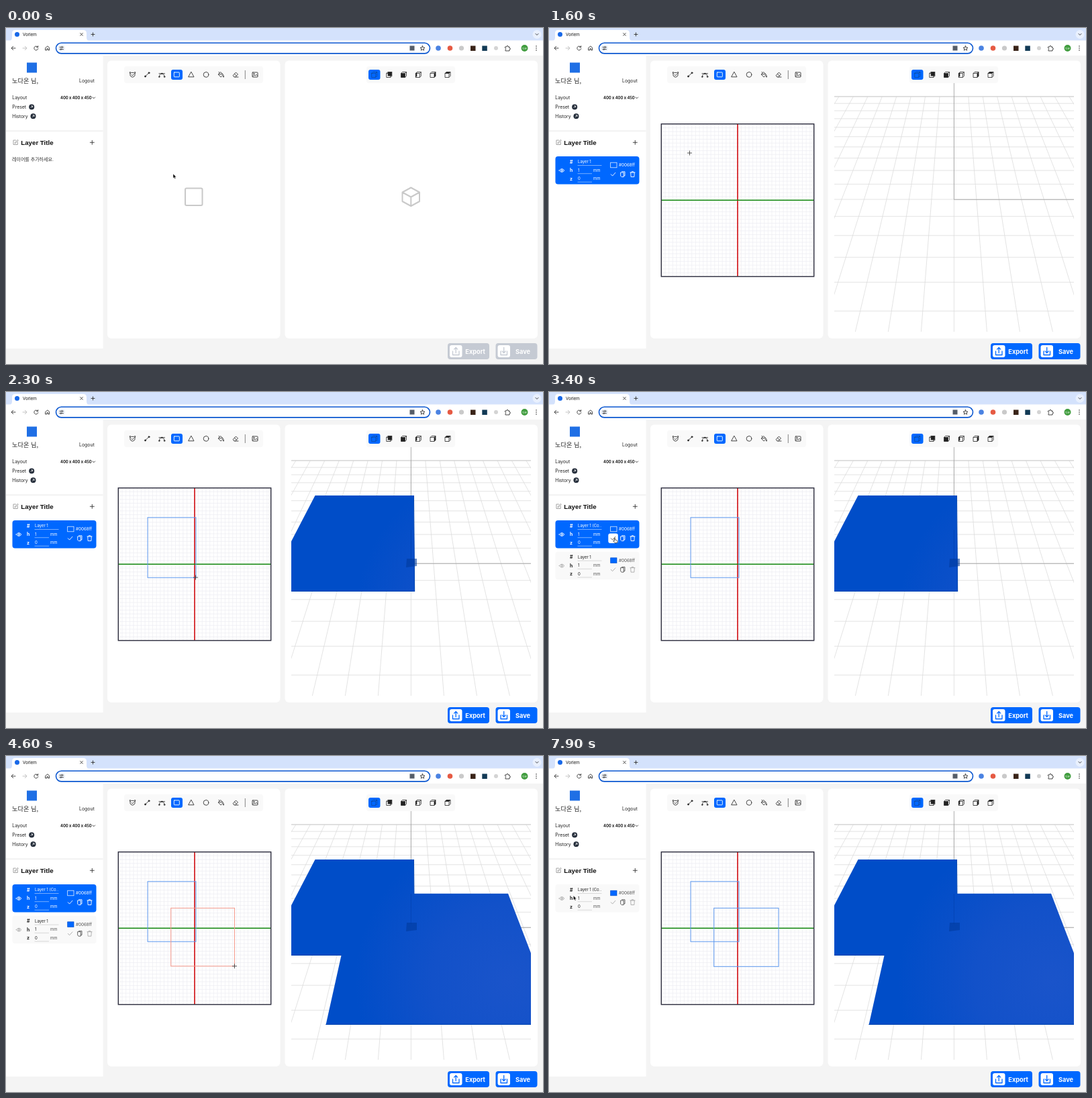
Animation, 800 px wide and 500 px high, one loop 8000 ms. Source, as an HTML page:

```html
<!DOCTYPE html>
<html lang="ko">
<head>
<meta charset="utf-8">
<title>Studio</title>
<style>
html, body { margin: 0; width: 100%; height: 100%; overflow: hidden; background: #f4f4f4; }
svg { display: block; width: 800px; height: 500px; font-family: Inter, sans-serif; }
.ui { font-family: Roboto, sans-serif; fill: #1f1f1f; }
.ko { font-family: "Noto Sans CJK KR", "Noto Sans CJK", sans-serif; }
.i { fill: none; stroke: #333; stroke-width: .9; stroke-linecap: round; stroke-linejoin: round; }
.i .f { fill: #222; }
.b { font-weight: 700; }
.btn { fill: #c5cad3; }
.on .btn { fill: #0068ff; }
.btn + rect { fill: #fff; }
.card { --bg: #f9f9f9; --ink: #222; --soft: #555; --icon: #aaa; --line: #ccc; --edge: #0050cc; --hover: #dcdcdc; font-size: 6px; }
.card.active { --bg: #0068ff; --ink: #fff; --soft: #fff; --icon: #fff; --line: #a9ccff; --edge: #fff; --hover: #fff; }
.card text { fill: var(--ink); }
.card .soft { fill: var(--soft); }
.card .i { stroke: var(--icon); }
.card .i.copy { stroke: var(--soft); }
.card .under { stroke: var(--line); stroke-width: .7; }
.card .hover { fill: var(--hover); }
.card.active .hot { stroke: #555; }
</style>
</head>
<body>
<svg id="stage" viewBox="0 0 800 500">
<defs>
  <clipPath id="view"><rect x="425" y="82" width="357" height="370"/></clipPath>
  <radialGradient id="blue" gradientUnits="userSpaceOnUse" cx="750" cy="335" r="230">
    <stop offset="0" stop-color="#1a54ca"/><stop offset=".5" stop-color="#1251c9"/><stop offset="1" stop-color="#004dc8"/>
  </radialGradient>
  <g id="box">
    <path d="M-4-2H2V4H-4ZM-4-2L-2-4H4L2-2M4-4V2L2 4" fill="none" stroke="#222" stroke-width=".8" stroke-linejoin="round"/>
  </g>
  <g id="go"><circle r="4" fill="#222b38"/><path d="M-1.5 1.5 1.5-1.5M-.9-1.5H1.5V.9" fill="none" stroke="#fff" stroke-width=".8"/></g>
</defs>

<!-- browser -->
<rect width="800" height="24" fill="#d4e2fc"/>
<path d="M5 19Q9 19 9 14V8Q9 3 14 3H115Q120 3 120 8V14Q120 19 124 19Z" fill="#fff"/>
<rect y="18.500" width="800" height="22.500" fill="#fff"/>
<circle cx="16.500" cy="9.500" r="3.500" fill="#1868e8"/>
<g class="ui">
  <text x="25" y="11.800" font-size="6.500">Vorlem</text>
  <text x="92" y="32.400" font-size="6.850">vorlem.site.example/studio</text>
</g>
<circle cx="791" cy="9.500" r="6.500" fill="#e9f0fe"/>
<g class="i">
  <path d="M110.700 7.700l3.600 3.600m0-3.600-3.600 3.600M127 9.500h5M129.500 7v5M789 8.500l2 2 2-2"/>
  <path d="M14 30H8.200m2.500-2.700L8 30l2.700 2.700"/>
  <path d="M25 30h5.800m-2.500-2.700L31 30l-2.700 2.700" stroke="#bbb"/>
  <path d="M47.300 28.300a3 3 0 1 0 .5 2.400M47.700 26.700v2h-2"/>
  <path d="M59 29.300l2.800-2.300 2.800 2.300v3.700h-1.900v-2.200h-1.800V33H59z"/>
</g>
<rect x="74.500" y="22.300" width="557" height="15.600" rx="7.800" fill="#fff" stroke="#0b57d0" stroke-width="1.600"/>
<circle cx="82.500" cy="30" r="5.600" fill="#eef2fa"/>
<g class="i" stroke-width=".8">
  <path d="M80 28.500h2.200M84.500 28.500h.8M80 31.600h.8M83.200 31.600h2.200"/>
  <circle cx="83.500" cy="28.500" r=".9"/><circle cx="81.800" cy="31.600" r=".9"/>
  <path d="M620.500 26.700l1 2.300 2.500.2-1.900 1.600.6 2.400-2.200-1.300-2.200 1.300.6-2.400-1.900-1.600 2.500-.2z"/>
  <path d="M744 28h2v-.6a1 1 0 0 1 2 0v.6h2v2h.4a1 1 0 0 1 0 2H750v2h-6v-1.800a1.200 1.200 0 0 0 0-2.200z"/>
</g>
<rect x="601.500" y="26.500" width="7" height="7" fill="#555d68"/>
<circle cx="644" cy="30" r="3.800" fill="#4a82e2"/>
<circle cx="661.500" cy="30" r="3.800" fill="#e65a43"/>
<circle cx="678.500" cy="30" r="3.600" fill="#c9c9c9"/>
<rect x="692" y="26.500" width="7.500" height="7.500" fill="#3a2418"/>
<rect x="709.300" y="26.500" width="7.500" height="7.500" fill="#123a55"/>
<circle cx="730" cy="30" r="3" fill="#d4d4d4"/>
<circle cx="772.500" cy="30" r="5" fill="#419d3f"/>
<text class="ko" x="772.500" y="31.500" font-size="3.800" text-anchor="middle" fill="#fff">다온</text>
<g fill="#333"><circle cx="790" cy="27" r=".8"/><circle cx="790" cy="30" r=".8"/><circle cx="790" cy="33" r=".8"/></g>

<!-- sidebar -->
<path d="M0 41H144.500V477H0Z" fill="#fff"/>
<rect y="152" width="144.500" height="2.500" fill="#f4f4f4"/>
<rect x="31" y="51.500" width="15" height="15" fill="#1f6fe5"/>
<text class="ko" x="9" y="81.800" font-size="9.200" font-weight="500" fill="#222">노다온 님,</text>
<g font-size="6.900" fill="#222">
  <text x="109" y="81.300">Logout</text>
  <text x="9.300" y="106.300">Layout</text>
  <text x="9.300" y="120.200">Preset</text>
  <text x="9.300" y="134">History</text>
  <text class="b" x="81" y="105.800" font-size="5.750">400 x 400 x 450</text>
</g>
<use href="#go" x="38.200" y="117.500"/><use href="#go" x="40.500" y="131.300"/>
<path class="i" d="M129 103l1.800 1.800 1.800-1.800" stroke-width=".7"/>
<path class="i" d="M14.500 167H11v6.500h6.300V170M13.200 171.500l.4-1.500 3.800-3.600 1 1-3.800 3.600z" style="stroke:#999" stroke-width=".7"/>
<text class="b" x="22.300" y="174" font-size="9.700" font-family="Liberation Sans, Arial, sans-serif" fill="#111">Layer Title</text>
<path class="i" d="M125.300 170.300h6M128.300 167.300v6"/>
<text id="hint" class="ko" x="9" y="197.500" font-size="7" fill="#333">레이어를 추가하세요.</text>
<g id="cards"></g>

<!-- panels -->
<rect x="151" y="48.500" width="257.500" height="413.500" rx="6" fill="#fff"/>
<rect x="415.500" y="48.500" width="376.500" height="413.500" rx="6" fill="#fff"/>
<rect x="176" y="57" width="207" height="25" rx="4" fill="#f9f9f9"/>
<rect x="537" y="57" width="132" height="25" rx="4" fill="#f9f9f9"/>
<rect x="246" y="62" width="17" height="15" rx="3" fill="#0068ff"/>
<rect x="540" y="62" width="17.500" height="15" rx="3" fill="#0068ff"/>
<g class="i">
  <path d="M185.300 67.500a3.700 3.700 0 1 0 6.400 0M184.500 67.500v-2l2 .9h4l2-.9v2M187 69.500l1.400 1.400 2-2.200"/>
  <path d="M207.800 71.700l4.900-4.700"/><circle class="f" cx="207.500" cy="72" r="1"/><circle class="f" cx="213" cy="66.800" r="1"/>
  <path d="M228.500 72.500q0-4.500 3.700-4.500t3.700 4.500M228 67.800h8.500"/><circle class="f" cx="228.300" cy="72.600" r=".8"/><circle class="f" cx="236.100" cy="72.600" r=".8"/><circle class="f" cx="232.200" cy="67.800" r=".7"/>
  <rect x="250.300" y="66" width="8" height="6.800" rx=".6" style="stroke:#fff"/>
  <path d="M276 65.500l4 7.300h-8z"/>
  <circle cx="298" cy="69.400" r="3.800"/>
  <path d="M316.500 68.800l3.200-3.300 4 4-3.300 3.300zM316.500 68.800h6M318.300 66.800l-1.300-1.500M324 71q1.200 1.500 0 2.300-1.100-.8 0-2.300"/>
  <path d="M338.500 70.200l4-4.200 3 3-4 4h-1.300zM340.400 68.200l3 3M341.500 73h4.500"/>
  <rect x="367" y="66" width="8" height="7" rx=".8"/><circle cx="369.300" cy="68.200" r=".6"/><path d="M367.300 72l2.400-2 1.500 1 1.700-1.700 2 2"/>
  <path d="M356.300 63v13" style="stroke:#777" stroke-linecap="butt"/>
</g>
<use href="#box" x="548.700" y="69.500" stroke-dasharray="1 .8" opacity=".75"/>
<g transform="translate(570.800 69.500)"><path d="M-2-4H4V2H-2Z" fill="#222"/><use href="#box"/></g>
<g transform="translate(592.500 69.500)"><path d="M-4-2H2V4H-4Z" fill="#222"/><use href="#box"/></g>
<g transform="translate(614.300 69.500)"><path d="M-4-2L-2-4V2L-4 4Z" fill="#222"/><use href="#box"/></g>
<g transform="translate(636 69.500)"><path d="M2-2L4-4V2L2 4Z" fill="#222"/><use href="#box"/></g>
<g transform="translate(658 69.500)"><path d="M-4-2L-2-4H4L2-2Z" fill="#222"/><use href="#box"/></g>

<g id="empty" fill="none" stroke="#c9c9c9" stroke-width="2" stroke-linejoin="round">
  <rect x="267" y="238.500" width="25.500" height="25.500" rx="2"/>
  <path d="M603.300 237.500L616 244.500V258L603.300 265 590.500 258V244.500ZM590.500 244.500L603.300 251.500 616 244.500M603.300 251.500V265"/>
</g>

<g id="work">
  <path id="fine" fill="none" stroke="#ededf2" stroke-width=".7"/>
  <path d="M281 143V370" stroke="#d3181d" stroke-width="1.700"/>
  <path d="M168 256.200H394" stroke="#12870f" stroke-width="1.500"/>
  <rect x="167.300" y="142.800" width="227.400" height="227" fill="none" stroke="#2b2b3c" stroke-width="1.400"/>
  <g clip-path="url(#view)" fill="none">
    <path id="floor" stroke="#dcdcdc" stroke-width=".8"/>
    <path d="M425 102H782" stroke="#c4c4c4" stroke-width=".8"/>
    <path d="M603.400 82V255.300H782" stroke="#9c9c9c" stroke-width=".8"/>
    <g id="solidA">
      <path d="M460.500 154H607.300L609 297H386Z" fill="url(#blue)"/>
      <path d="M425 296.300H609M607.500 154L608.700 297" stroke="#0043ae"/>
    </g>
    <g id="solidB">
      <path d="M520 204.800H748L823 400H476.500Z" fill="url(#blue)"/>
      <path d="M476.500 399.500H782" stroke="#0043ae" stroke-width="1.200"/>
    </g>
    <g id="shade">
      <path d="M597 248h15v11l-16 2z" fill="#003a9c" opacity=".6"/>
      <path d="M603.400 205V250" stroke="#003a9c" stroke-width=".7" opacity=".6"/>
    </g>
  </g>
  <rect id="rectA" fill="none"/>
  <rect id="rectB" fill="none"/>
</g>

<!-- actions -->
<g id="actions" class="b" font-size="9.200">
  <rect class="btn" x="658" y="469" width="62" height="24" rx="4"/><rect x="661" y="472" width="18.500" height="18" rx="3"/>
  <rect class="btn" x="729.500" y="469" width="62" height="24" rx="4"/><rect x="732.500" y="472" width="18.500" height="18" rx="3"/>
  <path id="arrows" fill="none" stroke-width="1.300" stroke-linecap="round" stroke-linejoin="round"
    d="M665.500 481v5.500h9.500V481M670.200 483.500v-8m-2.600 2.600l2.600-2.600 2.600 2.600M737 481v5.500h9.500V481M741.700 475.500v8m-2.600-2.600l2.600 2.600 2.600-2.600"/>
  <text x="684.300" y="484.600" fill="#fff">Export</text>
  <text x="759" y="484.600" fill="#fff">Save</text>
</g>

<g id="cursor">
  <path id="arrow" d="M0 0V6.600L1.500 5.300 2.500 7.600 3.700 7.100 2.700 4.800H4.700Z" fill="#000" stroke="#fff" stroke-width=".5"/>
  <path id="hand" d="M-.2.500Q.4-.4 1 .5V3L3.700 3.600Q4.400 3.800 4.300 4.600L3.800 7.600H.5L-1.800 4.700Q-1.700 3.800-.9 4.200L-.2 4.800Z" fill="#fff" stroke="#222" stroke-width=".7"/>
  <path id="cross" d="M-3.500 0H3.500M0-3.500V3.500" stroke="#333" stroke-width=".8"/>
</g>
</svg>

<script>
const $ = id => document.getElementById(id);
const show = (id, on) => $(id).style.display = on ? "" : "none";

const LOOP = 8000, STEP = 100;
const T = {
  add: 600, activate: 1000, copy: 3100, remove: 7200,
  a: { start: 1700, solid: 2200, done: 2300 },
  b: { start: 3900, solid: 4500, done: 4700 }
};
const BUTTONS = [95.5, 110, 124.5], ROWS = [217.7, 264.300];

// time, x, y of the pointer
const PATH = [
  [0, 249, 217], [400, 128, 169], [600, 128, 169], [900, 96, 216], [1000, 96, 216],
  [1600, 209.5, 186], [1700, 211, 187], [2200, 283, 276], [2300, 282.5, 276],
  [2900, 109, 216], [3200, 109, 216], [3400, 97.5, 217], [3500, 108, 217],
  [3900, 246, 226], [4100, 295, 278], [4400, 341, 313], [4600, 340.5, 312.7],
  [5000, 44, 226], [5300, 26, 240], [5900, 110, 264.5], [6100, 124.3, 265.5],
  [7500, 124.3, 265.5], [7900, 36.3, 207.7]
];

function pointer(t) {
  const i = PATH.findIndex(p => p[0] > t);
  if (i < 0) return PATH[PATH.length - 1].slice(1);
  const [t0, x0, y0] = PATH[i - 1], [t1, x1, y1] = PATH[i];
  const k = (t - t0) / (t1 - t0);
  return [x0 + (x1 - x0) * k, y0 + (y1 - y0) * k];
}

const card = (id, dy) => `
  <g id="${id}" class="card" transform="translate(0 ${dy})">
    <rect x="9.500" y="191" width="125" height="41.500" rx="4" fill="var(--bg)"/>
    <path class="i" d="M15.300 212q3.800-5 7.600 0-3.800 5-7.600 0z"/><circle class="i" cx="19.100" cy="212" r="1.300"/>
    <g class="b" font-size="7"><text x="31" y="201.600">#</text><text x="31" y="214">h</text><text x="31" y="226.500">z</text></g>
    <text class="name" x="43" y="201.400">Layer 1</text>
    <text x="43" y="213.800">1</text><text x="43" y="226.200">0</text>
    <text class="soft" x="66" y="213.800">mm</text><text class="soft" x="66" y="226.200">mm</text>
    <path class="under" d="M42.500 204.500h36M42.500 216.700h21.500M42.500 229.200h21.500"/>
    <rect x="91.700" y="200.200" width="9.300" height="7.600" fill="#0068ff" stroke="var(--edge)" stroke-width=".7"/>
    <text class="soft" x="104" y="206.300" font-size="6.300">#0068ff</text>
    <rect class="hover" y="210.500" width="14.500" height="14.500" rx="3"/>
    <path class="i tool" d="M92.300 217.700l2.300 2.400 4.300-4.800"/>
    <path class="i tool copy" d="M108.500 213.800h4.500v6h-1.500M107 215h4.300v6.500H108l-1-1z"/>
    <path class="i tool" d="M121 215h7M123.300 215v-1.300h2.400V215M121.700 215l.4 6.500h4.800l.4-6.500"/>
  </g>`;
$("cards").innerHTML = card("top", 0) + card("low", 46.6);

let fine = "";
for (let i = 1; i < 40; i++) {
  const d = i * 5.68;
  fine += `M${167.3 + d} 143V370M167 ${142.8 + d}H395`;
}
$("fine").setAttribute("d", fine);

// ground plane in perspective, vanishing at y = -170
const CX = 603.4, HORIZON = -170;
let floor = "";
for (let i = -5; i <= 10; i++) floor += `M425 ${HORIZON + 1 / (.002353 + i * .0001323)}H782`;
for (let i = -10; i <= 10; i++) {
  const x = y => CX + i * .0788 * (y - HORIZON);
  floor += `M${x(102)} 102L${x(452)} 452`;
}
$("floor").setAttribute("d", floor);

function drawRect(id, t, { start, done }, x, y, w, h) {
  const [px, py] = pointer(t), el = $(id), live = t < done;
  const clamp = (v, max) => live ? Math.max(0, Math.min(v, max)) : max;
  show(id, t >= start);
  const attrs = { x, y, width: clamp(px - x, w), height: clamp(py - y, h), stroke: live ? "#f59a8c" : "#5c98ee" };
  for (const k in attrs) el.setAttribute(k, attrs[k]);
}

function setCard(id, visible, active, hot) {
  const el = $(id), hover = el.querySelector(".hover");
  show(id, visible);
  el.classList.toggle("active", active);
  hover.style.display = hot < 0 ? "none" : "";
  if (hot >= 0) hover.setAttribute("x", BUTTONS[hot] - 7.2);
  el.querySelectorAll(".tool").forEach((p, i) => p.classList.toggle("hot", i === hot));
}

function render(t) {
  const [x, y] = pointer(t);
  const added = t >= T.add, active = t >= T.activate && t < T.remove;
  const copied = t >= T.copy && t < T.remove;
  const hotIn = (row, on) => on && Math.abs(y - ROWS[row]) < 7.3 ? BUTTONS.findIndex(b => Math.abs(x - b) < 7.2) : -1;
  const hotTop = hotIn(0, added), hotLow = hotIn(1, copied);

  show("hint", !added);
  show("empty", !added);
  show("work", added);
  $("actions").classList.toggle("on", added);
  $("arrows").setAttribute("stroke", added ? "#0068ff" : "#c5cad3");
  setCard("top", added, active, hotTop);
  setCard("low", copied, false, hotLow);
  $("top").querySelector(".name").textContent = t >= T.copy ? "Layer 1 (Co.." : "Layer 1";

  drawRect("rectA", t, T.a, 211, 186.8, 72, 89.4);
  drawRect("rectB", t, T.b, 245.7, 226.3, 96.3, 87);
  show("solidA", t >= T.a.solid);
  show("solidB", t >= T.b.solid);
  show("shade", t >= T.a.solid);

  const cross = added && x > 167 && x < 395 && y > 142 && y < 370;
  const hand = hotTop >= 0 || hotLow >= 0 || Math.hypot(x - 128, y - 170) < 5;
  show("cross", cross);
  show("hand", hand && !cross);
  show("arrow", !hand && !cross);
  $("cursor").setAttribute("transform", `translate(${x} ${y})`);
}

const begin = performance.now();
function tick() {
  const t = (performance.now() - begin) % LOOP;
  render(Math.floor(t / STEP) * STEP);
  requestAnimationFrame(tick);
}
tick();
</script>
</body>
</html>
```
